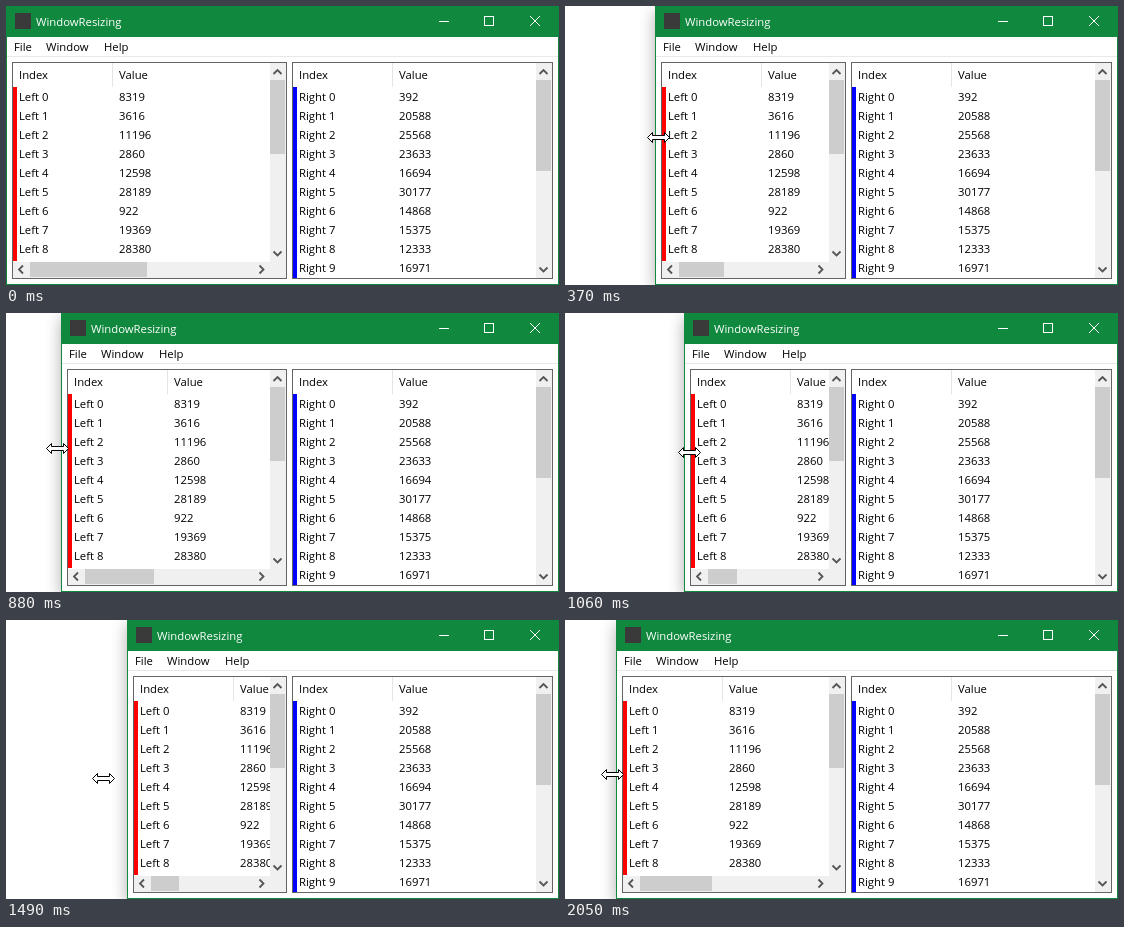
These frames come from a looping animation (553 by 279 pixels, 2.1 s). An HTML page with a canvas:

```html
<!DOCTYPE html>
<html lang="en">
<head>
<meta charset="utf-8">
<title>WindowResizing</title>
<style>
html, body { margin: 0; width: 100%; height: 100%; overflow: hidden; background: #fff; }
canvas { display: block; }
</style>
</head>
<body>
<canvas id="stage" width="553" height="279"></canvas>
<script>
const ctx = document.getElementById('stage').getContext('2d');
const W = 553, H = 279, LOOP = 2100;
const GREEN = '#10893e', TRACK = '#f0f0f0', THUMB = '#cdcdcd', FRAME = '#646464';

const leftValues = [8319, 3616, 11196, 2860, 12598, 28189, 922, 19369, 28380];
const rightValues = [392, 20588, 25568, 23633, 16694, 30177, 14868, 15375, 12333, 16971];

// time, pointer x, pointer y, window edge
const keys = [
  [0, -20, 133, 0], [370, 93, 131, 90], [650, 127, 129, 127],
  [850, 47, 134, 52], [1060, 124, 139, 119], [1110, 128, 142, 127],
  [1290, 13, 152, 16], [1460, 121, 158, 122], [1490, 97, 158, 121],
  [1640, 47, 156, 51], [1800, 107, 155, 108], [1860, 77, 154, 108],
  [1940, 48, 154, 56], [2050, 47, 154, 51]
];

// The screen refreshes in uneven steps of 40 or 50 ms, with one long hold.
const delays = ('3555555' + '4' + '5544' + '55' + 'A' + '4545454' + '55' +
  '5545545' + '4' + '555' + '5' + '544' + '5554' + '5')
  .split('').map(d => parseInt(d, 16) * 10);

function stepTime(t) {
  let start = 0;
  for (const d of delays) {
    if (t < start + d) return start;
    start += d;
  }
  return start;
}

const secant = (i, k) => (keys[i + 1][k] - keys[i][k]) / (keys[i + 1][0] - keys[i][0]);

function slope(i, k) {
  if (i === 0) return secant(0, k);
  if (i === keys.length - 1) return 0;
  const a = secant(i - 1, k), b = secant(i, k);
  return a * b > 0 ? 2 * a * b / (a + b) : 0;
}

// Monotone cubic through the keys
function track(t, k) {
  let i = 0;
  while (i < keys.length - 2 && t >= keys[i + 1][0]) i++;
  const a = keys[i], b = keys[i + 1], d = b[0] - a[0];
  const u = Math.min(1, (t - a[0]) / d), v = 1 - u;
  return Math.round(
    a[k] * v * v * (1 + 2 * u) + b[k] * u * u * (3 - 2 * u) +
    d * (slope(i, k) * u * v * v - slope(i + 1, k) * u * u * v));
}

function box(x, y, w, h, color) {
  ctx.fillStyle = color;
  ctx.fillRect(x, y, w, h);
}

function outline(x, y, w, h, color) {
  ctx.strokeStyle = color;
  ctx.lineWidth = 1;
  ctx.strokeRect(x + 0.5, y + 0.5, w - 1, h - 1);
}

function text(s, x, y, color = '#000') {
  ctx.fillStyle = color;
  ctx.fillText(s, x, y);
}

function path(points, color, width) {
  ctx.beginPath();
  points.forEach(([x, y]) => ctx.lineTo(x, y));
  ctx.strokeStyle = color;
  ctx.lineWidth = width;
  ctx.stroke();
}

function chevron(x, y, dx, dy) {
  const tip = [x + dx * 2, y + dy * 2];
  const arm = s => [x - dx * 2 + dy * 4 * s, y - dy * 2 + dx * 4 * s];
  path([arm(-1), tip, arm(1)], '#555', 1.8);
}

function vScroll(x, bottom, size) {
  box(x, 57, 16, bottom - 57, TRACK);
  box(x, 74, 15, size, THUMB);
  chevron(x + 7.5, 66, 0, -1);
  chevron(x + 7.5, bottom - 8.5, 0, 1);
}

function hScroll(x, right) {
  const view = right - x;
  box(x, 256, view + 16, 16, TRACK);
  box(x + 17, 256, Math.round(view * (view - 34) / 490), 15, THUMB);
  chevron(x + 8, 263.5, -1, 0);
  chevron(right - 8.5, 263.5, 1, 0);
}

function list(x, right, name, values, color, bottom) {
  ctx.save();
  ctx.beginPath();
  ctx.rect(x, 56, right - x, 217);
  ctx.clip();
  box(x, 56, right - x, 217, '#fff');
  text('Index', x + 7, 73);
  text('Value', x + 107, 73);
  box(x + 100, 57, 1, 24, '#e5e5e5');
  box(x + 1, 81, 4, bottom - 81, color);
  values.forEach((v, i) => {
    text(name + ' ' + i, x + 7, 95 + i * 19);
    text(v, x + 107, 95 + i * 19);
  });
  ctx.restore();
}

function titleBar(x) {
  box(x, 0, W - x, 31, GREEN);
  box(x + 9, 7, 16, 16, '#3a3a3a');
  text('WindowResizing', x + 30, 20, '#fff');
  box(433, 15, 10, 1, '#fff');
  outline(478, 10, 10, 10, '#fff');
  path([[524, 10], [534, 20]], '#fff', 1);
  path([[534, 10], [524, 20]], '#fff', 1);
}

function drawWindow(x) {
  ctx.save();
  ctx.shadowColor = 'rgba(0,0,0,0.32)';
  ctx.shadowBlur = 15;
  ctx.shadowOffsetY = 5;
  box(x, 0, W - x, H, '#fff');
  ctx.restore();

  titleBar(x);
  text('File', x + 8, 45);
  text('Window', x + 40, 45);
  text('Help', x + 98, 45);
  box(x + 1, 50, W - x - 2, 1, '#e8e8e8');

  list(x + 6, 281, 'Left', leftValues, '#f00', 255);
  vScroll(264, 256, 74);
  hScroll(x + 7, 264);
  outline(x + 6, 56, 275 - x, 217, FRAME);

  list(286, 547, 'Right', rightValues, '#00f', 272);
  vScroll(530, 272, 91);
  outline(286, 56, 261, 217, FRAME);
  outline(x, 0, W - x, H, GREEN);
}

function pointer(x, y) {
  const half = [[-11, 0], [-6, -5], [-6, -2], [6, -2], [6, -5], [11, 0]];
  const all = half.concat(half.slice(1, 5).reverse().map(([a, b]) => [a, -b]));
  ctx.beginPath();
  all.forEach(([a, b]) => ctx.lineTo(x + a + 0.5, y + b + 0.5));
  ctx.closePath();
  ctx.fillStyle = '#fff';
  ctx.fill();
  ctx.strokeStyle = '#000';
  ctx.lineWidth = 1;
  ctx.stroke();
}

function draw(now) {
  const t = stepTime(now % LOOP);
  box(0, 0, W, H, '#fff');
  ctx.font = '11.3px "Open Sans", "Noto Sans", sans-serif';
  drawWindow(track(t, 3));
  pointer(track(t, 1), track(t, 2));
}

const begin = performance.now();
function tick() {
  draw(performance.now() - begin);
  requestAnimationFrame(tick);
}
tick();
</script>
</body>
</html>
```
